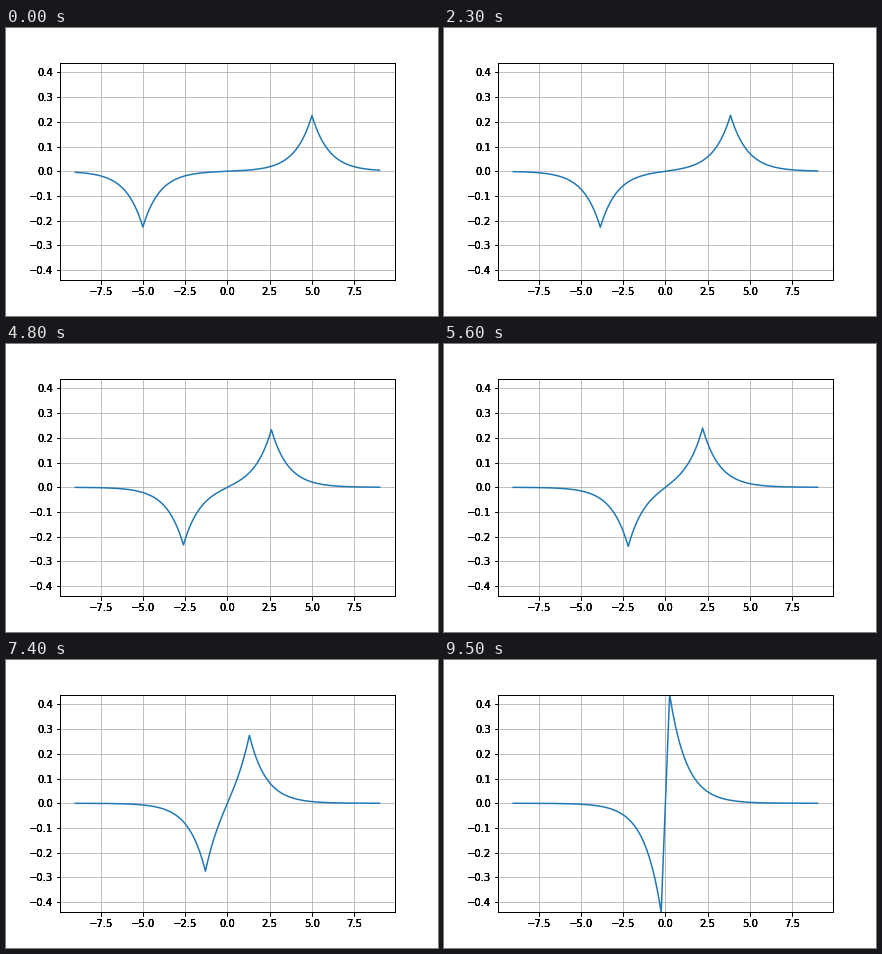
These frames come from a looping animation (432 by 288 pixels, 9600 ms). A matplotlib script:

```python
import numpy as np
import matplotlib.pyplot as plt
from matplotlib.animation import FuncAnimation

FRAMES = 96
INTERVAL = 100
START, STEP = 5.0, 0.05

plt.rcParams["font.family"] = "DejaVu Sans"
plt.rcParams["font.size"] = 10

x = np.linspace(-9, 9, 721)


def height(q):
    """Peak height, growing as the two peaks approach each other."""
    return 0.2254 * (1 + 1.36 * np.exp(-1.4 * q))


def profile(q):
    """Antisymmetric pair of cusped peaks at +q and -q."""
    pair = np.exp(-np.abs(x - q)) - np.exp(-np.abs(x + q))
    return height(q) * pair / (1 - np.exp(-2 * q))


def add_panel(fig):
    panel = fig.add_axes([0.125, 0.125, 0.775, 0.755])
    panel.set_xticks(np.arange(-3, 4) * 2.5)
    panel.set_yticks(np.arange(-4, 5) / 10)
    panel.set_xlim(-9.9, 9.9)
    panel.set_ylim(-0.44, 0.44)
    return panel


fig = plt.figure(figsize=(6, 4), dpi=72, facecolor="white")
ax = add_panel(fig)
ax.grid(color="#b0b0b0", linewidth=0.8)
line, = ax.plot(x, profile(START), color="#1f77b4", linewidth=1.5)

# Repeated transparent panels darken the frame and the tick labels.
for _ in range(3):
    add_panel(fig).patch.set_visible(False)


def update(i):
    line.set_ydata(profile(START - STEP * i))
    return line,


anim = FuncAnimation(fig, update, frames=FRAMES, interval=INTERVAL,
                     repeat=True, repeat_delay=0)
plt.show()
```
